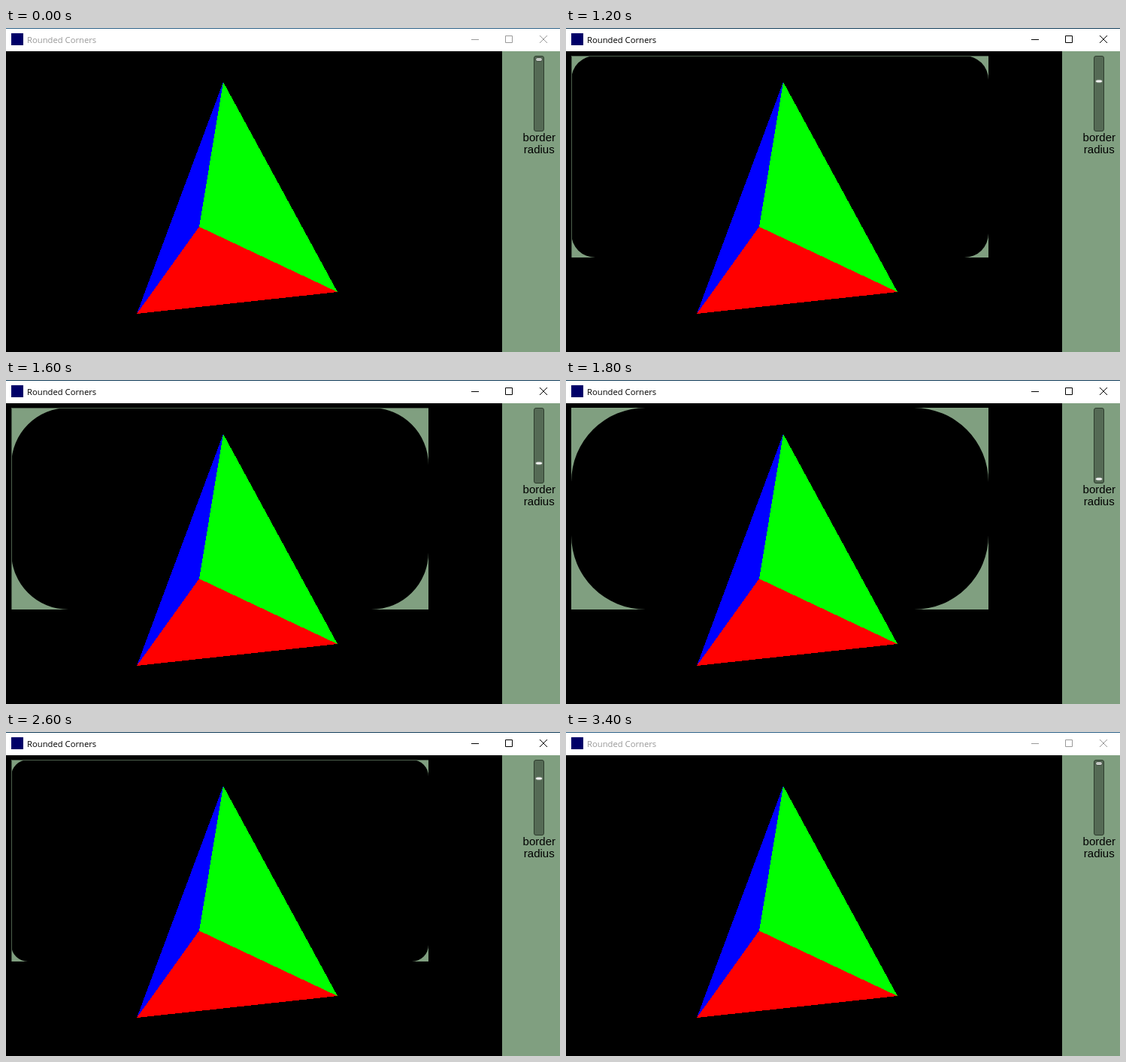
Animation, 737 px wide and 432 px high, one loop 3500 ms. Source, as an HTML page:

```html
<!DOCTYPE html>
<html lang="en">
<head>
<meta charset="utf-8">
<title>Rounded Corners</title>
<style>
  html, body { margin: 0; width: 100%; height: 100%; overflow: hidden; background: #000; }
  svg { display: block; }
  .chrome { --ink: #000; --edge: #0f3a57; }
  .chrome.inactive { --ink: #999; --edge: #2a5f86; }
  .caption { font: 11.25px "Open Sans", sans-serif; fill: var(--ink); }
  .buttons { fill: none; stroke: var(--ink); }
  .label { font: 15px "Liberation Sans", Arial, sans-serif; text-anchor: middle; }
</style>
</head>
<body>
<svg width="737" height="432" viewBox="0 0 737 432">
  <rect width="737" height="432"/>
  <g id="chrome" class="chrome">
    <rect width="737" height="31" fill="#fff"/>
    <rect width="737" height="1" fill="var(--edge)"/>
    <rect x="7" y="7" width="16" height="16" fill="#000068"/>
    <text class="caption" x="28" y="20">Rounded Corners</text>
    <g class="buttons">
      <path d="M619 15.5h10M664.5 10.5h9v9h-9z"/>
      <path d="M710 10l10 10m0-10l-10 10"/>
    </g>
  </g>

  <g shape-rendering="crispEdges">
    <path fill="#00f" d="M289 72L257 265 174 381z"/>
    <path fill="#0f0" d="M289 72L441 352 257 265z"/>
    <path fill="#f00" d="M257 265L441 352 174 381z"/>
  </g>

  <path id="corners" fill="#809f80" fill-rule="evenodd"/>
  <path id="hairline" fill="none" stroke="#4c5f4c" d="M7.5 306V37.5H562"/>

  <rect x="660" y="31" width="77" height="401" fill="#809f80"/>
  <rect x="702.5" y="37.5" width="13" height="100" rx="2.5" fill="#556a55" stroke="#2e3d2e"/>
  <rect id="knob" x="704.5" width="9" rx="2.5"/>
  <text class="label" x="709.3" y="151">border</text>
  <text class="label" x="709.3" y="167">radius</text>
</svg>
<script>
const LOOP = 3500, STEP = 100;
const BOX = { x: 7, y: 37, w: 555, h: 269 };
// [time, slider travel in px]
const TRAVEL = [[0, 0], [700, 0], [1200, 29], [1600, 69], [1800, 90], [2200, 90],
                [2300, 71], [2600, 20], [2700, 4], [2800, 0], [LOOP, 0]];
const [chrome, corners, hairline, knob] =
  ["chrome", "corners", "hairline", "knob"].map(id => document.getElementById(id));

function travelAt(t) {
  const i = TRAVEL.findIndex(([time]) => time > t);
  const [t0, a] = TRAVEL[i - 1], [t1, b] = TRAVEL[i];
  return a + (b - a) * (t - t0) / (t1 - t0);
}

function cornerPath(r) {
  const { x, y, w, h } = BOX;
  const arc = (dx, dy) => `a${r} ${r} 0 0 1 ${dx} ${dy}`;
  return `M${x} ${y}h${w}v${h}h${-w}z` +
    `M${x + r} ${y}h${w - 2 * r}${arc(r, r)}v${h - 2 * r}${arc(-r, r)}` +
    `h${2 * r - w}${arc(-r, -r)}v${2 * r - h}${arc(r, -r)}z`;
}

function setAttributes(node, values) {
  for (const name in values) node.setAttribute(name, values[name]);
}

function draw(now) {
  const t = Math.floor(now % LOOP / STEP) * STEP;
  const travel = Math.round(travelAt(t));
  const radius = Math.round(travel * 1.1);
  const active = t >= 700 && t < 3300;
  const hovered = t >= 700 && t < 3200;

  chrome.classList.toggle("inactive", !active);
  corners.setAttribute("d", radius ? cornerPath(radius) : "");
  hairline.style.display = radius > 0 && radius < 77 ? "" : "none";
  setAttributes(knob, hovered
    ? { y: 40 + travel, height: 4, fill: "#f4f4f4", stroke: "#6b7d6b" }
    : { y: 39.5, height: 5, fill: "#c4c8c4", stroke: "#3a493a" });
  requestAnimationFrame(draw);
}
draw(0);
</script>
</body>
</html>
```
